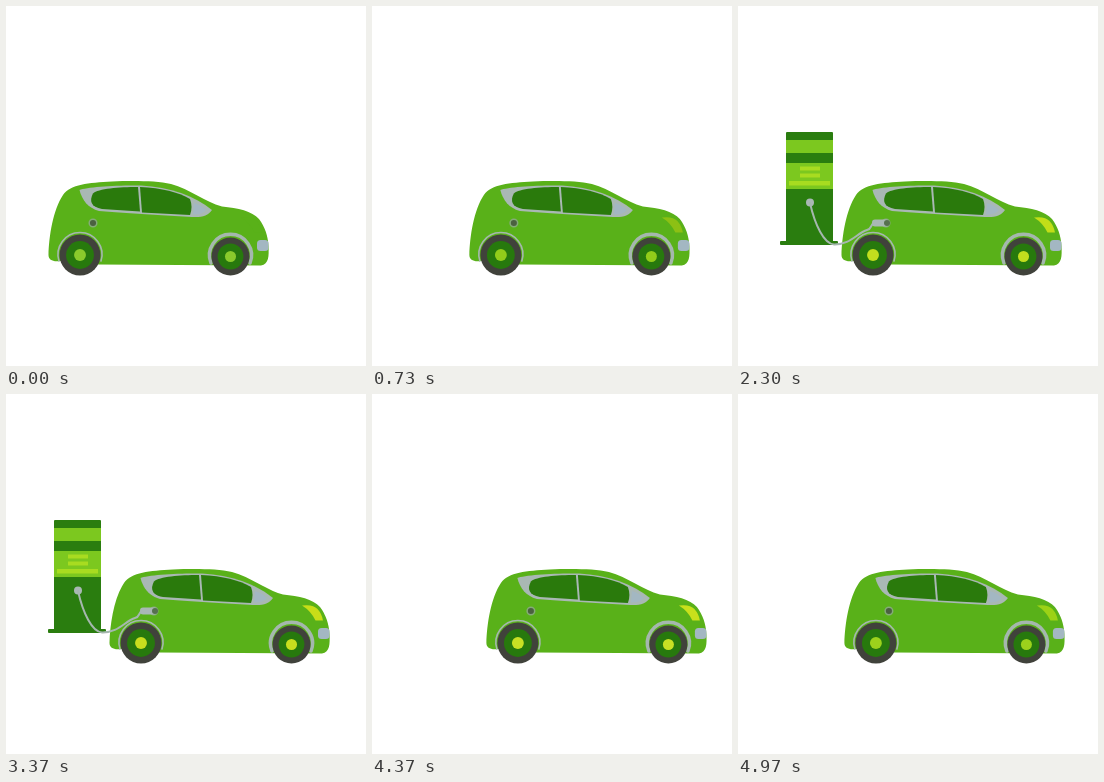
An HTML page for the animation above (5000 ms loop, 360 px wide and 360 px high).

```html
<!DOCTYPE html>
<html lang="en">
<head>
<meta charset="utf-8">
<title>Charging car</title>
<style>
  html, body { margin: 0; width: 100%; height: 100%; overflow: hidden; background: #fff; }
  svg { display: block; width: 100vw; height: 100vh; }
  .body { fill: #59b119; }
  .trim { fill: #a9b8b4; }
  .glass { fill: #2a7a0c; }
  .pale { fill: #a3b7c2; }
  .tire { fill: #40423b; }
  .rim { fill: #27790d; }
  .dark { fill: #2a7d0f; }
  .light { fill: #7cc81f; }
  .bar { fill: #a8dc20; }
  .line { fill: none; stroke: #a5b7ae; stroke-linecap: round; }
</style>
</head>
<body>
<svg viewBox="0 0 360 360">
  <g id="pump">
    <rect class="dark" x="48" y="126" width="47" height="111" rx="1"/>
    <rect class="light" x="48" y="134" width="47" height="13"/>
    <rect class="light" x="48" y="157" width="47" height="26"/>
    <rect class="bar" x="62" y="160.5" width="20" height="4"/>
    <rect class="bar" x="62" y="167.5" width="20" height="4"/>
    <rect class="bar" x="51" y="175" width="41" height="4.5"/>
    <rect class="dark" x="42" y="235" width="58" height="4" rx="1"/>
    <circle class="trim" cx="72" cy="196.5" r="4"/>
  </g>
  <g id="car">
    <path class="body" d="M42.500 249C43 230 47 204 57 189C65 178 82 177 106 175.500C128 174.800 150 174.800 165 178C184 183 199 196 216 200.500C232 202 246 205 253 213C259 221 262 230 262.500 240C263 250 263 258 255 259.500L92 258.500L54 255C47 256 42.500 254 42.500 249Z"/>
    <path class="trim" d="M73.500 184C80 181 112 179 135 179.500C164 181 189 190 206 204C202 210 196 211.500 186 211C151 209 118 207 93 205C82 202 76 194 73.500 184Z"/>
    <path class="glass" d="M87 187.500C92 182.500 113 181 132 181L134 205.500L96 203C85 201 83 195 87 187.500Z"/>
    <path class="glass" d="M134 181C156 182 172 186 184 193Q187 201 184 209L136 206.500Z"/>
    <path class="pale" d="M188 197Q195 199 200 204Q197 208.500 187 208.500Z"/>
    <circle cx="87" cy="217" r="3.800" fill="#4b6140" stroke="#85ab78" stroke-width="1.500"/>
    <path id="lamp" d="M235 211.500Q246 210 250.500 215Q255 220 256 226.500H248.500Q244 217 235 211.500Z"/>
    <rect class="pale" x="251" y="234" width="11.500" height="11" rx="3.500"/>
    <path class="line" stroke-width="1.6" d="M53 255A22 22 0 1 1 95 255"/>
    <path class="line" stroke-width="3.500" d="M205 257A21 21 0 1 1 244 257"/>
    <g id="wheels"></g>
  </g>
  <path id="hose" class="line" stroke-width="2" pathLength="100" d="M72 197C77 219 86 238 96 238.500C112 239 119 227 129 224C134 223 132 219 136 217"/>
  <g id="plug">
    <rect class="trim" x="134" y="213.500" width="17" height="7" rx="3"/>
    <circle cx="149" cy="217" r="3" fill="#56704f"/>
  </g>
</svg>
<script>
  const LOOP = 5000;
  const $ = id => document.getElementById(id);
  const clamp = v => Math.min(1, Math.max(0, v));
  const sine = p => (1 - Math.cos(Math.PI * p)) / 2;
  const ramp = (t, from, to) => sine(clamp((t - from) / (to - from)));

  // Rear wheel, then front wheel: centre and radius
  $('wheels').innerHTML = [[74, 249, 20.5], [224.5, 250.5, 19]].map(([x, y, r]) =>
    [['tire', r], ['rim', r * 0.68], ['hub', r * 0.29]].map(([name, size]) =>
      `<circle class="${name}" cx="${x}" cy="${y}" r="${size}"/>`).join('')).join('');
  const hubs = document.querySelectorAll('.hub');

  // Time, lamp colour, hub colour
  const glow = [
    [0, [89, 177, 25], [138, 202, 44]],
    [330, [212, 220, 24], [212, 220, 32]],
    [730, [140, 192, 20], [146, 204, 26]],
    [1570, [190, 222, 24], [190, 222, 30]],
    [3370, [200, 222, 24], [200, 222, 30]],
    [4370, [200, 224, 28], [200, 224, 36]],
    [4970, [156, 210, 22], [156, 210, 28]],
    [LOOP, [156, 210, 22], [156, 210, 28]]
  ];

  function glowAt(t, part) {
    const i = glow.findIndex(step => step[0] > t);
    const a = glow[i - 1], b = glow[i];
    const p = (t - a[0]) / (b[0] - a[0]);
    return `rgb(${a[part].map((v, k) => Math.round(v + (b[part][k] - v) * p))})`;
  }

  function draw(t) {
    const shift = 61 * ramp(t, 0, 920) + 23 * ramp(t, 4110, 4650) - 24 * ramp(t, 4640, 5090);
    $('car').setAttribute('transform', `translate(${shift} 0)`);

    // The pump grows from the middle of its base
    const size = ramp(t, 760, 1160) - ramp(t, 3900, 4340);
    $('pump').setAttribute('transform', `translate(71 239) scale(${size}) translate(-71 -239)`);
    $('pump').style.display = size > 0.001 ? '' : 'none';

    const reach = 100 * (ramp(t, 1120, 2150) - ramp(t, 3440, 3900));
    $('hose').setAttribute('stroke-dasharray', `${reach} 200`);
    $('hose').style.display = reach > 0.1 ? '' : 'none';
    $('plug').style.opacity = ramp(t, 2100, 2300) - ramp(t, 3380, 3500);

    $('lamp').style.fill = glowAt(t, 1);
    const hub = glowAt(t, 2);
    hubs.forEach(el => { el.style.fill = hub; });
  }

  const start = performance.now();
  function tick() {
    draw((performance.now() - start) % LOOP);
    requestAnimationFrame(tick);
  }
  tick();
</script>
</body>
</html>
```
